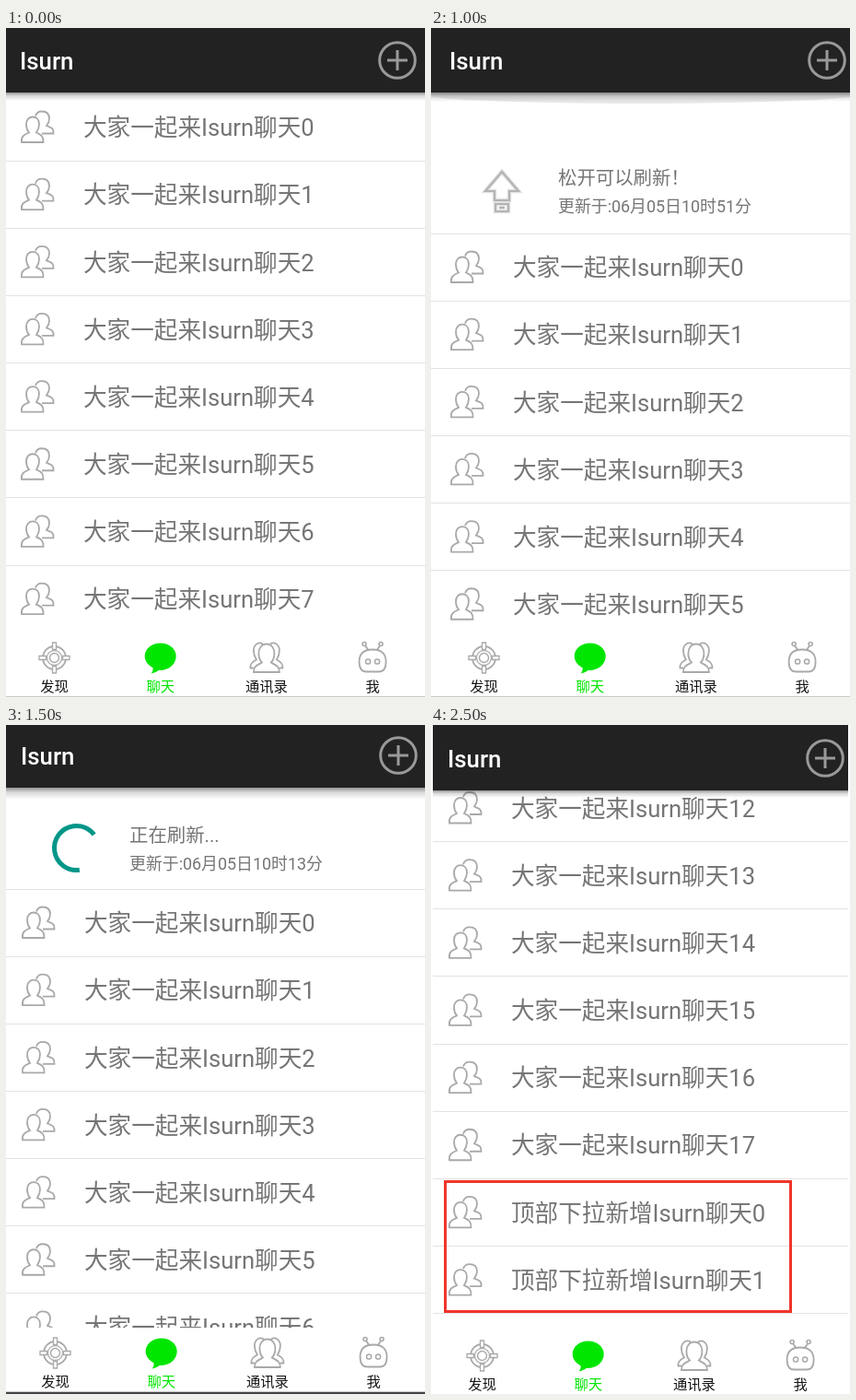
An HTML page with a canvas for the animation above (3 s loop, 455 by 726 pixels).

```html
<!DOCTYPE html>
<html lang="zh-CN">
<head>
<meta charset="utf-8">
<title>下拉刷新</title>
<style>
html, body { margin: 0; width: 100%; height: 100%; overflow: hidden; background: #fff; }
canvas { display: block; width: 455px; height: 726px; }
</style>
</head>
<body>
<canvas id="stage" width="455" height="726"></canvas>
<script>
const W = 455, H = 726, STEP = 500, ROW = 73.15;
const APP = 'Isurn';
const FONT = "Roboto, 'Noto Sans CJK SC', 'Noto Sans CJK', sans-serif";
const GREY = '#a9a9a9', TEXT = '#757575', GREEN = '#00e600', TEAL = '#009688';
const ctx = document.getElementById('stage').getContext('2d');

// dx, dy: screen shift; top: upper edge of row `first`; inset: white side margin
const scenes = [
  { dx: 0, dy: 0, top: 71, shadow: 9 },
  { dx: 1, dy: 1, top: 169.5, shadow: 9, inset: 1,
    pull: { title: '下拉可以刷新！', minute: 20, arrow: 0, lift: 0 } },
  { dx: 5, dy: 0, top: 223, shadow: 10, glow: true,
    pull: { title: '松开可以刷新！', minute: 51, arrow: Math.PI, lift: 0 } },
  { dx: 1, dy: -2, top: 178, shadow: 13,
    pull: { title: '正在刷新...', minute: 13, arc: [82, 323], lift: 2 } },
  { dx: 5, dy: 0, top: 180, shadow: 10, touch: [333, 355],
    pull: { title: '正在刷新...', minute: 37, arc: [180, 342], lift: 2 } },
  { dx: 3, dy: 1, top: 53.5, shadow: 8, inset: 2, first: 12, marked: true }
];

function text(str, x, y, size, color, weight = 400, align = 'left') {
  ctx.font = `${weight} ${size}px ${FONT}`;
  ctx.fillStyle = color;
  ctx.textAlign = align;
  ctx.fillText(str, x, y);
}

function at(x, y, draw) {
  ctx.save();
  ctx.translate(x, y);
  draw();
  ctx.restore();
}

function stroke(path, color = GREY, width = 1.8) {
  ctx.strokeStyle = color;
  ctx.lineWidth = width;
  ctx.stroke(path);
}

function circle(x, y, r) {
  const p = new Path2D();
  p.arc(x, y, r, 0, Math.PI * 2);
  return p;
}

const person = new Path2D('M1 34.5C0 28 4 26 9 24C6.5 21 6 18 6 15C6 10 9 7 13 7C17 7 20 10 20 15C20 18 19 21 17 24C22 26 25 28 24.5 34.5Z');
const behind = new Path2D('M16 6C17 2.5 20 1 23 1C28 1 31 4 31 9C31 12 30 14 28 16.5C33 18.5 36 19 35.5 25H23');
const trio = new Path2D('M-14 15.5C-14 8 -9 8 -5 5C-8 2 -8.5 -1 -8.5 -5C-8.5 -11 -5 -15 0 -15C5 -15 8.5 -11 8.5 -5C8.5 -1 8 2 5 5C9 8 14 8 14 15.5Z');
const trioSide = new Path2D('M4 -15C9 -18 14 -14 14 -8C14 -4 13 -1 11 2C15 4 18 6 17.5 11H14');
const bubble = new Path2D('M-10 17C-6 16 -4 15 -2 13.5C9 14 17 7 17 -2C17 -10 9 -16 0 -16C-9 -16 -17 -10 -17 -2C-17 4 -13 8 -8 11C-8 13 -8.5 15 -10 17Z');
const robot = new Path2D('M-14.5 4C-14.5 -5 -9 -9 0 -9C9 -9 14.5 -5 14.5 4C14.5 12 12 15 7 15H-7C-12 15 -14.5 12 -14.5 4ZM-5 -9L-8 -13M5 -9L8 -13');
const arrow = new Path2D('M-7 -22H7V-14H-7ZM-8 -10H8V0H18L0 21L-18 0H-8ZM-3 -18H3');

function compassIcon() {
  stroke(circle(0, 0, 12.5));
  stroke(circle(0, 0, 8), '#b5b5b5', 1.4);
  stroke(circle(0, 0, 5), GREY, 1.4);
  for (let i = 0; i < 4; i++) {
    ctx.rotate(Math.PI / 2);
    ctx.fillStyle = '#fff';
    ctx.fillRect(10, -2, 7, 4);
    stroke(new Path2D('M9 -2H16.5V2H9Z'), GREY, 1.3);
  }
}

function bubbleIcon() {
  ctx.fillStyle = GREEN;
  ctx.fill(bubble);
}

function contactsIcon() {
  stroke(trioSide);
  ctx.save();
  ctx.scale(-1, 1);
  stroke(trioSide);
  ctx.restore();
  ctx.fillStyle = '#fff';
  ctx.fill(trio);
  stroke(trio);
}

function robotIcon() {
  stroke(robot);
  for (const s of [-1, 1]) {
    stroke(circle(9 * s, -15, 2), GREY, 1.6);
    stroke(circle(5 * s, 4, 2.6), GREY, 1.5);
  }
}

const tabs = [['发现', compassIcon], ['聊天', bubbleIcon], ['通讯录', contactsIcon], ['我', robotIcon]];

function rule(y, s) {
  const inset = s.inset || 0;
  ctx.fillStyle = '#e3e3e3';
  ctx.fillRect(inset, Math.round(y - 0.5), W - 2 * inset, 1);
}

function drawPull(s) {
  const p = s.pull, x = 133 + s.dx, base = s.top + p.lift;
  text(p.title, x, base - 53, 20.4, TEXT);
  text(`更新于:06月05日10时${p.minute}分`, x, base - 22.8, 17.9, TEXT);
  if (p.arc) {
    const ring = new Path2D();
    ring.arc(75.5 + s.dx, s.top - 44.5, 24, ...p.arc.map(a => a * Math.PI / 180));
    stroke(ring, TEAL, 5);
  } else {
    at(72 + s.dx, s.top - 46, () => {
      ctx.rotate(p.arrow);
      stroke(arrow, '#e2e2e2', 4.5);
      stroke(arrow, '#b4b4b4', 2.2);
    });
  }
  rule(s.top, s);
}

function drawList(s) {
  ctx.save();
  ctx.beginPath();
  ctx.rect(0, 70 + s.dy, W, 586 - 0 + (s.dy > 0 ? 0 : 0));
  ctx.clip();
  if (s.pull) drawPull(s);
  const first = s.first || 0, limit = s.marked ? 8 : 9;
  for (let i = 0; i < limit; i++) {
    const n = first + i, y = s.top + i * ROW;
    const label = n < 18 ? `大家一起来${APP}聊天${n}` : `顶部下拉新增${APP}聊天${n - 18}`;
    at(16 + s.dx, y + 18.5, () => {
      stroke(behind);
      ctx.fillStyle = '#fff';
      ctx.fill(person);
      stroke(person);
    });
    text(label, 84 + s.dx, y + 46.2, 25.6, TEXT);
    rule(y + ROW, s);
  }
  ctx.restore();
}

function drawHeader(s) {
  const inset = s.inset || 0, bottom = 70 + s.dy, wide = W - 2 * inset;
  const fade = ctx.createLinearGradient(0, bottom, 0, bottom + s.shadow);
  fade.addColorStop(0, 'rgba(0,0,0,.42)');
  fade.addColorStop(0.4, 'rgba(0,0,0,.15)');
  fade.addColorStop(1, 'rgba(0,0,0,0)');
  ctx.fillStyle = fade;
  ctx.fillRect(inset, bottom, wide, s.shadow);
  if (s.glow) {
    ctx.fillStyle = 'rgba(0,0,0,.09)';
    ctx.beginPath();
    ctx.ellipse(W / 2, bottom, 250, 12, 0, 0, Math.PI);
    ctx.fill();
  }
  ctx.fillStyle = '#222';
  ctx.fillRect(inset, 0, wide, bottom);
  text(APP, 15 + s.dx, 44.7 + s.dy, 25.8, '#fff', 500);
  at(425 + s.dx, 35 + s.dy, () => {
    stroke(circle(0, 0, 19.3), '#999', 3);
    stroke(new Path2D('M-11 0H11M0 -11V11'), '#999', 3);
  });
}

function drawTabs(s) {
  tabs.forEach(([label, icon], i) => {
    const x = 52.5 + 115.2 * i + s.dx;
    at(x, 683.5 + s.dy, icon);
    text(label, x, 719.5 + s.dy, 15.3, i === 1 ? GREEN : '#151515', 400, 'center');
  });
  ctx.fillStyle = '#c8c8c8';
  ctx.fillRect(0, 725 + s.dy, W, 1);
  ctx.fillStyle = '#444';
  ctx.fillRect(0, 726 + s.dy, W, 4);
}

function drawTouch([x, y]) {
  at(x, y, () => {
    const outer = circle(0, 0, 19.3), inner = circle(0, 0, 9.3);
    const fill = ctx.createRadialGradient(0, 0, 8, 0, 0, 19);
    fill.addColorStop(0, 'rgba(165,228,216,.82)');
    fill.addColorStop(1, 'rgba(205,243,236,.82)');
    ctx.fillStyle = fill;
    ctx.fill(outer);
    stroke(outer, '#0d5050', 1.6);
    ctx.fillStyle = 'rgba(85,198,178,.9)';
    ctx.fill(inner);
    stroke(inner, '#0d5050', 1.6);
  });
}

function render(time) {
  const s = scenes[Math.floor(time / STEP) % scenes.length];
  ctx.fillStyle = '#fff';
  ctx.fillRect(0, 0, W, H);
  drawList(s);
  drawHeader(s);
  drawTabs(s);
  if (s.touch) drawTouch(s.touch);
  if (s.marked) {
    ctx.strokeStyle = '#f0352b';
    ctx.lineWidth = 3;
    ctx.strokeRect(15.5, 495.5, 375, 141);
  }
}

const start = performance.now();
function tick() {
  render(performance.now() - start);
  requestAnimationFrame(tick);
}
tick();
</script>
</body>
</html>
```
